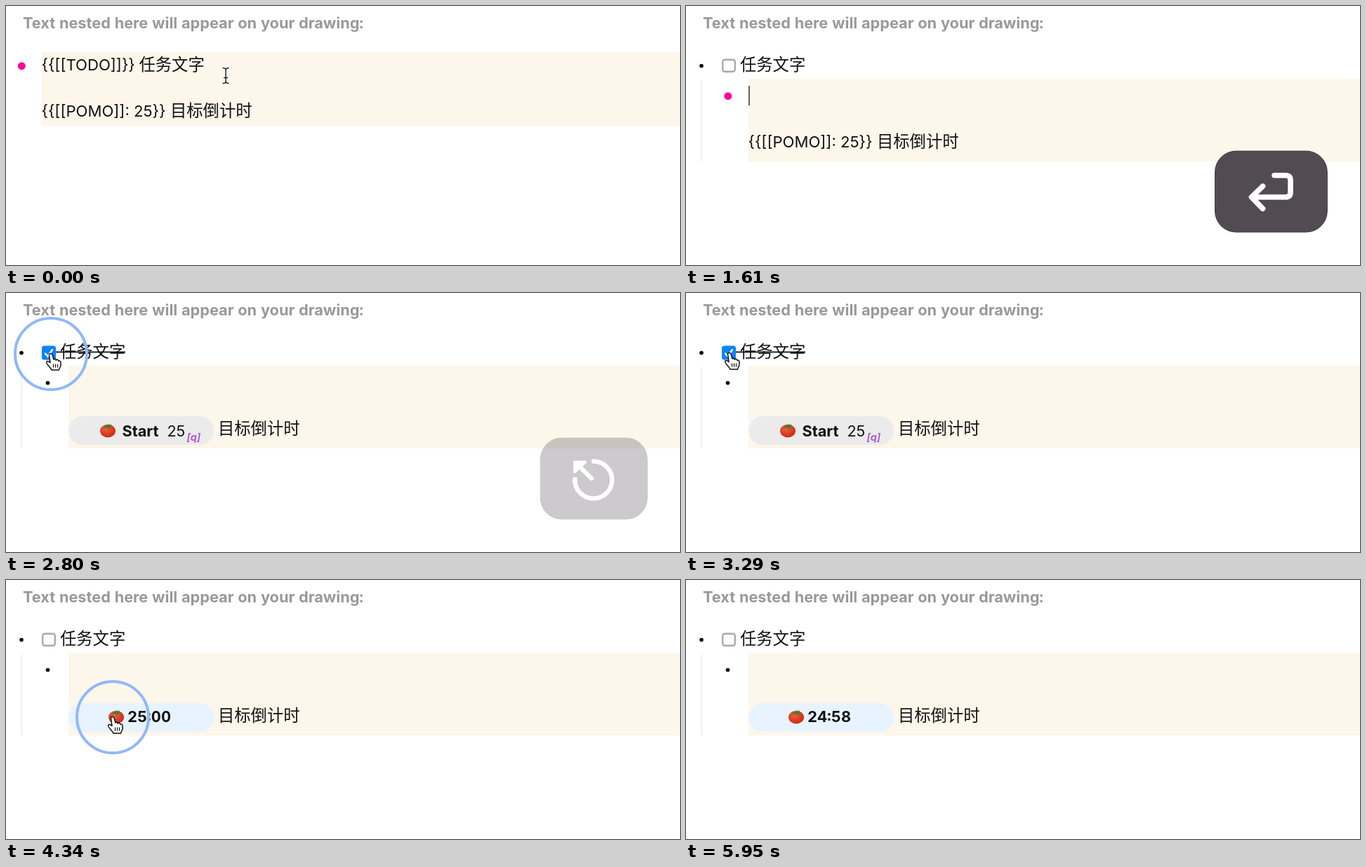
Animation of 960 by 370 pixels, one loop 6090 ms. Source, as an HTML page:

```html
<!DOCTYPE html>
<html lang="zh">
<head>
<meta charset="utf-8">
<style>
  html, body { margin: 0; width: 100%; height: 100%; overflow: hidden; background: #fff; }
  svg { display: block; width: 100%; height: 100%; }
  text { font: 400 22.1px Inter, "Noto Sans", sans-serif; fill: #111; white-space: pre; }
  .cjk { font: 400 23.3px "Noto Sans CJK SC", "Noto Sans CJK", sans-serif; }
  .bold { font-size: 21.7px; font-weight: 700; font-variant-numeric: tabular-nums; }
  .key path { fill: none; stroke: #fff; stroke-linecap: round; stroke-linejoin: round; }
  .key rect { fill: #524b52; stroke: #3f393f; }
  .cream { fill: #fdf6ea; }
</style>
</head>
<body>
<svg viewBox="0 0 960 370">
  <defs>
    <radialGradient id="skin" cx=".4" cy=".35" r=".7">
      <stop offset="0" stop-color="#f2603f"/>
      <stop offset="1" stop-color="#c62812"/>
    </radialGradient>
    <g id="tomato">
      <ellipse cy="1" rx="11" ry="9.3" fill="url(#skin)"/>
      <path d="M0-6L-5-7L-4-4L-6-2L-1-4L1-1L3-4L7-4L4-6L5-9L1-7L0-10Z" fill="#437c2d"/>
    </g>
    <path id="beamShape" d="M-4-11Q0-11 0-8Q0-11 4-11M0-8V8M-4 11Q0 11 0 8Q0 11 4 11M-2.5 3H2.5"/>
  </defs>

  <text x="24" y="32" class="bold" style="fill:#999">Text nested here will appear on your drawing:</text>

  <g id="draft">
    <rect class="cream" x="51" y="65.5" width="909" height="106"/>
    <text x="50.5" y="92">{{[[TODO]]}}</text>
    <text x="189.5" y="92" class="cjk">任务文字</text>
    <text x="50.5" y="158">{{[[POMO]]: 25}}</text>
    <text x="234" y="158" class="cjk">目标倒计时</text>
    <circle cx="22.3" cy="85.7" r="5.5" fill="#fb0a9a"/>
  </g>

  <g id="task">
    <circle cx="22" cy="85.5" r="2.8"/>
    <rect x="52.2" y="76.7" width="17.6" height="17" rx="3" fill="#fff" stroke="#aaa" stroke-width="2.4"/>
    <text x="77" y="92" class="cjk">任务文字</text>
    <g id="done">
      <rect x="51" y="75.5" width="20" height="20" rx="3.5" fill="#0a84ff"/>
      <path d="M56 86.5L59.5 90.5L66 81" fill="none" stroke="#fff" stroke-width="2.4" stroke-linecap="round"/>
      <path d="M71 84.3H170" stroke="#111" stroke-width="1.8"/>
    </g>
  </g>

  <path id="guide" d="M22 106V222" stroke="#ebebeb" stroke-width="1.4"/>

  <g id="childDraft">
    <rect class="cream" x="89" y="104" width="909" height="118"/>
    <circle cx="59.8" cy="128.7" r="5.5" fill="#fb0a9a"/>
    <text x="88.5" y="202">{{[[POMO]]: 25}}</text>
    <text x="272" y="202" class="cjk">目标倒计时</text>
  </g>

  <g id="child">
    <rect class="cream" x="89" y="104" width="871" height="118"/>
    <circle cx="59.5" cy="128.5" r="2.8"/>
    <rect id="button" x="89" y="176" width="207" height="41" rx="20.5"/>
    <g id="idle">
      <use href="#tomato" x="145" y="196"/>
      <text x="165.5" y="205" class="bold">Start</text>
      <text x="229.5" y="205" style="font-size:21.5px">25</text>
      <text x="257.5" y="211" style="font-size:14.5px;font-style:italic;font-weight:600;fill:#a94fd0">[q]</text>
    </g>
    <g id="running">
      <use href="#tomato" x="157" y="195"/>
      <text id="clock" x="173" y="203" class="bold"></text>
    </g>
    <text x="302" y="202" class="cjk">目标倒计时</text>
  </g>

  <path id="caret" d="M0-14V14" stroke="#111" stroke-width="1.3"/>

  <g id="enterKey" class="key">
    <rect x="753.5" y="207.2" width="159.8" height="115.8" rx="30"/>
    <path stroke-width="7.6" d="M838 242H854Q861 242 861 249V266Q861 273 854 273H806M821.5 257.5L805.5 273L821.5 289.5"/>
  </g>
  <g id="escKey" class="key">
    <rect x="761.3" y="207.2" width="152" height="115.8" rx="30"/>
    <path stroke-width="6.4" d="M837 240.5A26.5 26.5 0 1 1 810.3 266M814 245L834 265"/>
    <path stroke-width="4" style="fill:#fff" d="M810 241.5H825L810 255.5Z"/>
  </g>

  <circle id="ring" fill="none" stroke="#90b8f8" stroke-width="4"/>
  <g id="cursor" stroke-linejoin="round">
    <g id="beam" fill="none" stroke-linecap="round">
      <use href="#beamShape" stroke="#fff" stroke-width="3.4"/>
      <use href="#beamShape" stroke="#222" stroke-width="1.5"/>
    </g>
    <g id="hand" stroke="#111" stroke-width="1.5">
      <path fill="#fff" d="M-2.5 1.5C-3-1 1.5-1.5 2.2 1.5L4 8C5 6 6.5 7 7 9C8 7.5 10.5 8 11 10.3C12 9.5 14 10 14 12.5V16C14 19.5 11.5 20 11.5 23H1C0 20-4 17-6 13.5C-7.5 10.5-4 9-1 12.5Z"/>
      <path fill="none" stroke-width="1.2" d="M3.5 14.5V19.5M6.5 14.5V19.5M9.5 14.5V19.5"/>
    </g>
    <path id="arrow" fill="#111" stroke="#fff" stroke-width="1.5" d="M0 0V19L4.5 15L7.5 22L11 20.5L8 14H14Z"/>
  </g>
</svg>

<script>
const LOOP = 6090, STEP = 70;
const SPLIT = 1190, INDENT = 1610, LEAVE = 1960;
const CHECK = 2800, UNCHECK = 3500, START = 4270;
const CLICKS = [[CHECK, 64, 87], [UNCHECK, 62, 86], [START, 152, 196]];
const CURSOR_PATH = [
  [0, 313, 99.5], [1820, 313, 99.5], [2100, 84, 90], [2240, 64, 87],
  [2940, 64, 87], [3080, 62, 86], [3710, 62, 86], [3990, 152, 196],
  [4830, 152, 196], [5320, 378, 248], [5670, 378, 248], [5880, 384, 372], [LOOP, 384, 372]
];

const $ = id => document.getElementById(id);
const show = (id, visible) => $(id).setAttribute('display', visible ? 'inline' : 'none');
const set = (id, attrs) => Object.entries(attrs).forEach(([k, v]) => $(id).setAttribute(k, v));
const between = (t, from, to) => t >= from && t < to;
const clamp = v => Math.max(0, Math.min(1, v));

function cursorAt(t) {
  const next = CURSOR_PATH.findIndex(point => point[0] > t);
  const [t0, x0, y0] = CURSOR_PATH[next - 1], [t1, x1, y1] = CURSOR_PATH[next];
  const p = (t - t0) / (t1 - t0), ease = p * p * (3 - 2 * p);
  return [x0 + (x1 - x0) * ease, y0 + (y1 - y0) * ease];
}

function drawBlocks(t) {
  const split = t >= SPLIT, indented = t >= INDENT, rendered = t >= LEAVE;
  show('draft', !split);
  show('task', split);
  show('done', between(t, CHECK, UNCHECK));
  show('guide', indented);
  show('childDraft', split && !rendered);
  set('childDraft', { transform: `translate(${indented ? 0 : -37.5})` });
  show('child', rendered);
  show('idle', t < START);
  show('running', t >= START);
  set('button', { fill: t < START ? '#ebebeb' : '#e7f3fe' });
  $('clock').textContent = t < 4830 ? '25:00' : t < 5810 ? '24:59' : '24:58';

  show('caret', between(t, 140, 630) || between(t, 910, LEAVE));
  const [x, y] = !split ? [283.5, 83] : [indented ? 90 : 52.5, 128];
  set('caret', { transform: `translate(${x} ${y})` });
}

function drawKeys(t) {
  show('enterKey', between(t, 910, LEAVE));
  show('escKey', between(t, LEAVE, 2940));
  set('escKey', { opacity: clamp((2884 - t) / 290) });
}

function drawPointer(t) {
  const [x, y] = cursorAt(t);
  const overBox = x < 74 && y < 98;
  const overButton = x > 89 && x < 296 && y > 176 && y < 217;
  const hand = overBox || overButton, arrow = y > 222;
  show('cursor', t < 140 || t >= 1820);
  set('cursor', { transform: `translate(${x} ${y})` });
  show('hand', hand);
  show('arrow', arrow);
  show('beam', !hand && !arrow);

  const click = CLICKS.find(([start]) => between(t, start, start + 350));
  show('ring', click);
  if (click) {
    const fade = clamp((t - click[0] - 70) / 280);
    set('ring', { cx: click[1], cy: click[2], r: 51 + 25 * fade, opacity: 1 - fade });
  }
}

function frame() {
  const t = Math.floor((performance.now() % LOOP) / STEP) * STEP;
  drawBlocks(t);
  drawKeys(t);
  drawPointer(t);
  requestAnimationFrame(frame);
}
frame();
</script>
</body>
</html>
```
